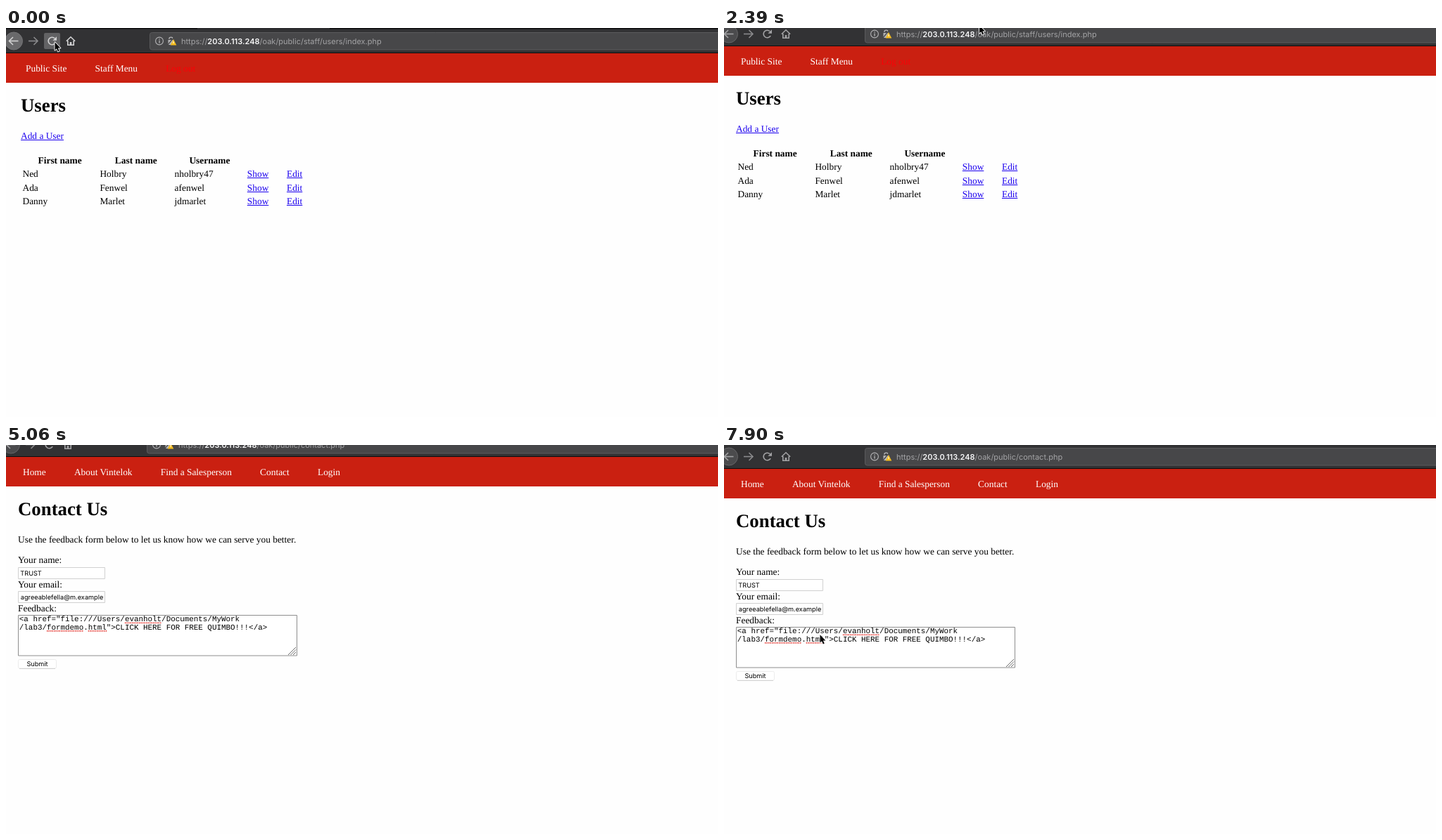
An HTML page with a canvas for the animation above (8 s loop, 1012 by 554 pixels).

```html
<!DOCTYPE html>
<html lang="en">
<head>
<meta charset="utf-8">
<title>Browser session</title>
<style>
html, body { margin: 0; width: 100%; height: 100%; overflow: hidden; background: #fefefe; }
canvas { display: block; }
</style>
</head>
<body>
<canvas id="stage" width="1012" height="554"></canvas>
<script>
const W = 1012, H = 554, LOOP = 8000, BEAT = 150;
const ctx = document.getElementById('stage').getContext('2d');
ctx.textRendering = 'geometricPrecision';

const SERIF = '13.4px "Liberation Serif", "Times New Roman", serif';
const BOLD = 'bold ' + SERIF;
const TITLE = 'bold 26.8px "Liberation Serif", "Times New Roman", serif';
const FIELD = '9.2px Inter, sans-serif';
const ADDRESS = '11px Inter, sans-serif';
const HOST = '600 11px Inter, sans-serif';
const MONO = '10.88px "Liberation Mono", monospace';

// Motion: eased glides, sampled once per beat like a screen recording
const linear = p => p;
const easeIn = p => p ** 3;
const easeOut = p => 1 - (1 - p) ** 2;
const smooth = p => (1 - Math.cos(Math.PI * p)) / 2;

const glide = (start, end, to, ease = linear) => ({ start, end, to, ease });

function follow(origin, glides, t) {
  return glides.reduce((pos, g) => {
    const beats = Math.floor((t - g.start) / BEAT);
    const p = g.ease(Math.min(1, Math.max(0, beats * BEAT / (g.end - g.start))));
    return pos.map((v, i) => v + (g.to[i] - v) * p);
  }, origin);
}

const pan = t => follow([0, 0], [
  glide(2240, 2390, [-4, -10]),
  glide(2840, 3440, [-4, -21], easeOut),
  glide(4910, 5210, [-4, -2], easeIn)
], t).map(Math.round);

const cursor = t => follow([69, 19.5], [
  glide(150, 600, [362.5, -9]),
  glide(2240, 2390, [362.5, -4.5]),
  glide(2990, 3290, [320, -26]),
  glide(5360, 6110, [111, 345.5], smooth),
  glide(6250, 6550, [93, 345.5], smooth),
  glide(7300, 7900, [136, 269.5], smooth)
], t);

const within = (t, a, b) => t >= a && t < b;

function text(str, x, y, font, color = '#000', align = 'left') {
  ctx.font = font;
  ctx.fillStyle = color;
  ctx.textAlign = align;
  ctx.fillText(str, x, y);
  return ctx.measureText(str).width;
}

function link(str, x, y) {
  const w = text(str, x, y, SERIF, '#1c00ee');
  ctx.fillRect(x, Math.round(y) + 1, w, 1);
}

function rect(x, y, w, h, fill) {
  ctx.fillStyle = fill;
  ctx.fillRect(x, y, w, h);
}

function paint(fill, stroke, width = 1) {
  if (fill) { ctx.fillStyle = fill; ctx.fill(); }
  if (stroke) { ctx.strokeStyle = stroke; ctx.lineWidth = width; ctx.stroke(); }
}

function box(x, y, w, h, r, fill, stroke) {
  ctx.beginPath();
  ctx.roundRect(x, y, w, h, r);
  paint(fill, stroke);
}

function arc(x, y, r, from, to, fill, stroke, width) {
  ctx.beginPath();
  ctx.arc(x, y, r, from, to);
  paint(fill, stroke, width);
}

function line(pts, color, width = 1.6) {
  ctx.beginPath();
  pts.forEach(p => ctx.lineTo(...p));
  paint(null, color, width);
}

function shape(pts, fill) {
  ctx.beginPath();
  pts.forEach(p => ctx.lineTo(...p));
  ctx.closePath();
  paint(fill);
}

function arrow(x, dir, color) {
  line([[x - 6.5, 18.5], [x + 6.5, 18.5]], color);
  line([[x + dir, 13], [x + dir * 6.5, 18.5], [x + dir, 24]], color);
}

function navButtons(active, hover) {
  const ink = active ? '#d2d2d3' : '#a2a2a4';
  arc(11, 18.5, 12.5, 0, 7, active ? '#69696b' : '#4b4b4d', active ? '#757577' : '#666668');
  arrow(11, -1, ink);
  arrow(38.5, 1, '#8b8b8d');

  if (hover) box(54, 7, 23, 23, 2, '#626264');
  arc(65.5, 18.5, 5.3, 0.5, 5.5, null, ink, 1.6);
  shape([[72, 12.2], [72, 17.8], [66.4, 17.8]], ink);

  line([[85.8, 18.8], [92, 12.8], [98.2, 18.8]], ink);
  line([[87.8, 18], [87.8, 24.2], [96.2, 24.2], [96.2, 18]], ink);
  rect(90.7, 20, 2.6, 4, ink);
}

function addressBar(path) {
  const ink = '#b5b5b7', soft = '#a3a3a5';
  box(204.5, 6.5, W, 24.5, 3, '#474749', '#5b5b5d');

  arc(218, 18.5, 5.4, 0, 7, null, ink, 1.1);
  rect(217.4, 17.6, 1.3, 4, ink);
  rect(217.4, 15.2, 1.3, 1.3, ink);

  arc(234.5, 15.8, 2.7, Math.PI, 0, null, ink, 1.4);
  rect(230.5, 17, 8, 7, ink);
  line([[230, 24], [239, 13]], '#474749', 1.2);
  shape([[238, 16], [242.3, 24.6], [233.7, 24.6]], '#f5bd1f');
  rect(237.5, 19, 1, 3, '#fff');

  let x = 249;
  x += text('https://', x, 22.8, ADDRESS, soft);
  x += text('203.0.113.248', x, 22.8, HOST, '#f6f6f7');
  text(path, x, 22.8, ADDRESS, soft);
}

function toolbar(path, active, hover) {
  rect(0, 0, W + 8, 36, '#323234');
  rect(0, 0, W + 8, 1.5, '#0d0d0e');
  rect(272, 0, 188, 1.5, '#323234');
  rect(0, 35, W + 8, 1, '#0d0d0e');
  navButtons(active, hover);
  addressBar(path);
}

function header(title, items) {
  rect(0, 36, W + 8, 42, '#ca2011');
  let x = 28;
  for (const str of items) {
    x += text(str, x, 62, SERIF, str === 'Log out' ? '#fb0007' : '#fff') + 40.2;
  }
  text(title, 21, 119, TITLE);
}

function usersPage() {
  header('Users', ['Public Site', 'Staff Menu', 'Log out']);
  link('Add a User', 21, 158);
  text('First name', 76.6, 192.5, BOLD, '#000', 'center');
  text('Last name', 184.8, 192.5, BOLD, '#000', 'center');
  text('Username', 289.4, 192.5, BOLD, '#000', 'center');
  [
    ['Ned', 'Holbry', 'nholbry47'],
    ['Ada', 'Fenwel', 'afenwel'],
    ['Danny', 'Marlet', 'jdmarlet']
  ].forEach(([first, last, user], i) => {
    const y = 212.2 + i * 19.5;
    text(first, 23.5, y, SERIF);
    text(last, 133.4, y, SERIF);
    text(user, 239.6, y, SERIF);
    link('Show', 342.8, y);
    link('Edit', 399, y);
  });
}

function misspelt(x, y, w) {
  ctx.fillStyle = '#e0231c';
  for (let d = 0; d < w - 1; d += 2.5) ctx.fillRect(x + d, y, 1.5, 1.5);
}

function code(str, x, y, marked) {
  const cell = text(str, x, y, MONO) / str.length;
  for (const word of marked) misspelt(x + str.indexOf(word) * cell, y + 1.3, word.length * cell);
}

function field(label, y, focus) {
  text(label, 21, y, SERIF);
  if (focus) box(20, y + 4, 126, 19, 2, '#a9d3f8');
  box(21.5, Math.floor(y) + 6.5, 123, 16, 0, '#fff', focus ? '#4f9fe6' : '#d0d0d0');
}

function contactPage(focus, caret) {
  header('Contact Us', ['Home', 'About Vintelok', 'Find a Salesperson', 'Contact', 'Login']);
  text('Use the feedback form below to let us know how we can serve you better.', 21, 158, SERIF);

  field('Your name:', 187.3, focus);
  text('TRUST', 24.3, 204.8, FIELD);
  if (caret) rect(54.8, 195.5, 1, 11.5, '#000');

  field('Your email:', 221.5);
  text('agreeablefella@m.example', 142.3, 239, FIELD, '#000', 'right');

  text('Feedback:', 21, 255.8, SERIF);
  box(21.5, 261.5, 396, 57.5, 0, '#fff', '#8e8e8e');
  code('<a href="file:///Users/evanholt/Documents/MyWork', 22.8, 270.3, ['evanholt']);
  code('/lab3/formdemo.html">CLICK HERE FOR FREE QUIMBO!!!</a>', 22.8, 281.8, ['formdemo', 'html']);
  for (let d = 4; d < 12; d += 3.5) line([[416 - d, 318], [416, 318 - d]], '#6a6a6a', 1);

  box(21.5, 324.5, 54, 12.5, 2, '#fff', '#ececec');
  rect(23, 337, 51, 1, '#d2d2d2');
  text('Submit', 48.5, 333.6, FIELD, '#000', 'center');
}

function pointer(x, y) {
  ctx.save();
  ctx.translate(x, y);
  ctx.lineJoin = 'round';
  ctx.beginPath();
  [[0.5, 0.8], [0.5, 12], [3, 9.7], [4.9, 14], [6.7, 13.2], [4.9, 9], [8.4, 9]]
    .forEach(p => ctx.lineTo(...p));
  ctx.closePath();
  paint(null, '#fff', 1.8);
  paint('#000');
  ctx.restore();
}

function draw(t) {
  const contact = t >= 3890;
  const focus = within(t, 3890, 4930);
  const caret = focus && !within(t, 4190, 4620);
  const path = contact ? '/oak/public/contact.php' : '/oak/public/staff/users/index.php';

  rect(0, 0, W, H, '#fefefe');
  ctx.save();
  ctx.translate(...pan(t));
  toolbar(path, t < 2240 || focus, t < 300);
  if (contact) contactPage(focus, caret);
  else usersPage();
  ctx.restore();
  pointer(...cursor(t));
}

const start = performance.now();
function tick() {
  draw((performance.now() - start) % LOOP);
  requestAnimationFrame(tick);
}
tick();
</script>
</body>
</html>
```
